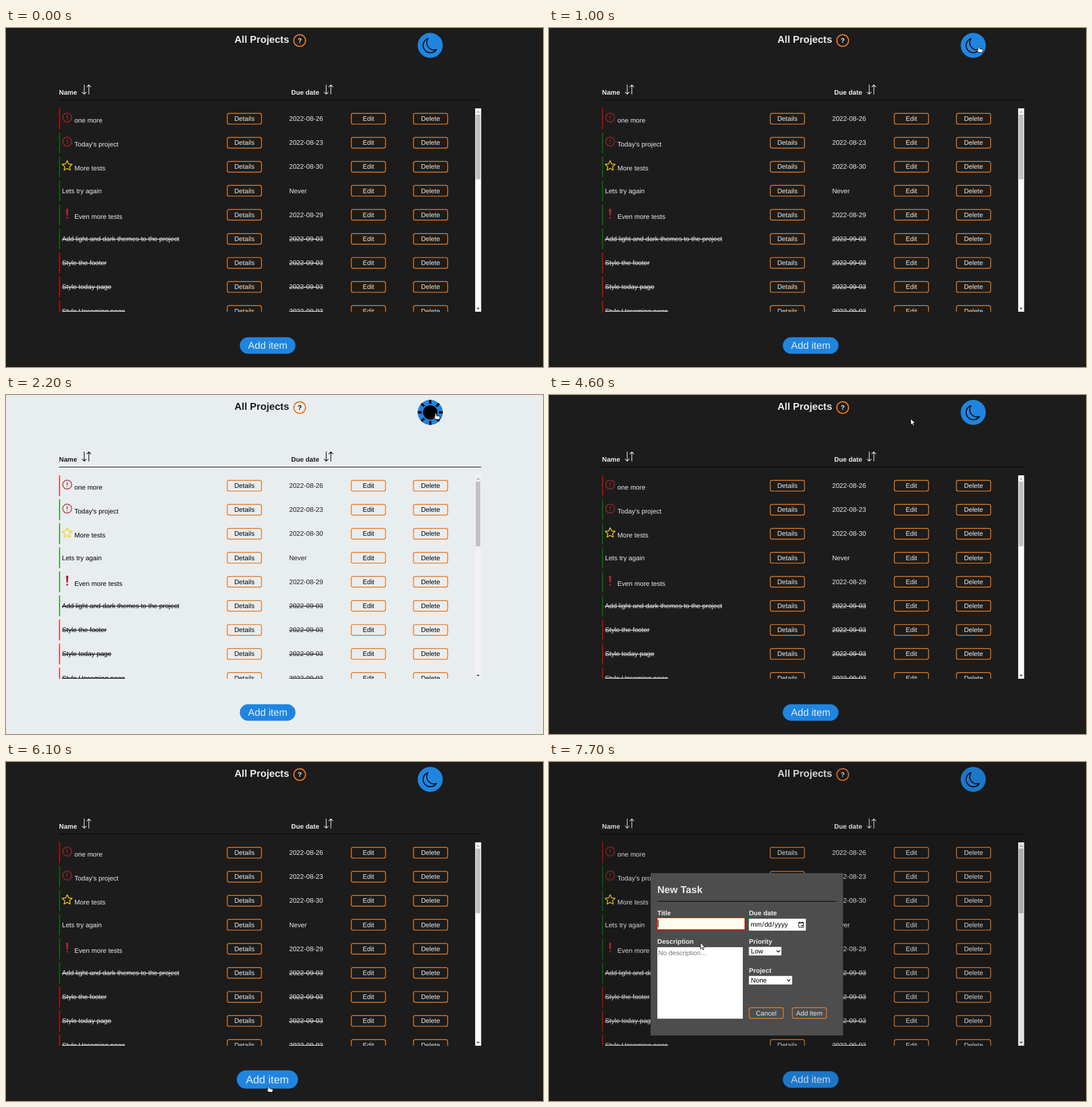
Write an HTML page that moves like this. It is 942 px wide and 595 px high and loops after 8000 ms.

```html
<!DOCTYPE html>
<html lang="en">
<head>
<meta charset="utf-8">
<title>All Projects</title>
<style>
  html, body { margin: 0; width: 100%; height: 100%; overflow: hidden; background: #1c1c1c; }
  #stage {
    --bg: #1c1c1c; --text: #e8edf0; --fade: #e8edf0; --arrow: #e8edf0; --track: #fbfbfb;
    display: block; width: 942px; height: 595px; background: var(--bg);
    font: 11.63px "Liberation Sans", Arial, sans-serif; text-rendering: geometricPrecision;
  }
  #stage.light { --bg: #e8edf0; --text: #1c1c1c; --fade: #000; --arrow: #000; --track: #f1f1f1; }
  #stage.fade0 { --fade: #dce0e2; --arrow: #c4cfd0; }
  #stage.fade1 { --fade: #747779; --arrow: #626768; }
  text { fill: var(--text); white-space: pre; }
  .fading { fill: var(--fade); }
  .bold { font-weight: bold; }
  .big { font-size: 17.45px; }
  .mid { text-anchor: middle; }
  .done { text-decoration: line-through; }
  .pale { fill: #e8edf0; }
  .ink { fill: #000; }
  .hint { fill: #757575; }
  .blue { fill: #1f85e0; }
  .white { fill: #fff; }
  .frame { fill: none; stroke: #e5791f; stroke-width: 1.45; }
  .line { fill: none; stroke: #000; }
  .sort { fill: none; stroke: var(--arrow); stroke-linecap: round; stroke-linejoin: round; }
  .alert { fill: none; stroke: brown; stroke-width: 1.1; stroke-linejoin: round; stroke-linecap: round; }
  .star { fill: none; stroke: #f6d010; stroke-width: 1.4; stroke-linejoin: round; }
  .cursor { fill: #fff; stroke: #000; stroke-width: .9; stroke-linejoin: round; }
</style>
</head>
<body>
<svg id="stage" viewBox="0 0 942 595">
  <defs>
    <clipPath id="listClip"><rect x="90" y="141" width="760" height="357"/></clipPath>
    <clipPath id="discClip"><circle r="22"/></clipPath>
    <path id="sort" class="sort" transform="scale(1.16)"
      d="M4.5 1V15M1.5 12l3 3 3-3M11.5 15V1M8.5 4l3-3 3 3"/>
  </defs>

  <text class="bold big" x="400.7" y="26">All Projects</text>
  <circle class="frame" cx="515.2" cy="22" r="10.3" style="stroke-width:2"/>
  <text class="bold mid fading" x="515.2" y="26.2">?</text>

  <g transform="translate(744.2 30.5)">
    <circle class="blue" r="22"/>
    <path id="moon" class="line" transform="translate(-12.9 -13) scale(1.64)" stroke-linejoin="round"
      d="M5.4 .6A7.8 7.8 0 1 0 14.5 12.3A7.8 7.8 0 0 1 5.4 .6Z"/>
    <g id="sun" clip-path="url(#discClip)"><circle r="12.6"/></g>
  </g>

  <text class="bold" x="93" y="117">Name</text>
  <use href="#sort" x="132" y="98.7"/>
  <text class="bold" x="500.3" y="117">Due date</text>
  <use href="#sort" x="556.5" y="98.7"/>
  <rect x="93" y="126" width="740.5" height="1"/>

  <g id="list" clip-path="url(#listClip)"></g>
  <rect x="823" y="141" width="10.5" height="357" style="fill:var(--track)"/>
  <rect x="824" y="152" width="8" height="113.5" fill="#c1c1c1"/>
  <path d="M825.3 148.5l2.9-3 2.9 3z" fill="#a3a3a3"/>
  <path d="M825.3 491l2.9 3 2.9-3z" fill="#505050"/>

  <g transform="translate(459 557.3)">
    <g id="add">
      <rect class="blue" x="-48.8" y="-14.5" width="97.6" height="29" rx="14.5"/>
      <text class="big mid pale" y="5.8">Add item</text>
    </g>
  </g>

  <g id="modal">
    <rect width="942" height="595" opacity=".1"/>
    <rect x="178.3" y="195" width="337.5" height="285" fill="#4d4d4d"/>
    <text class="bold big" x="190" y="230">New Task</text>
    <rect x="190" y="244" width="314" height="1"/>
    <g class="bold">
      <text x="190" y="269">Title</text>
      <text x="350.7" y="269">Due date</text>
      <text x="190" y="319">Description</text>
      <text x="350.7" y="319">Priority</text>
      <text x="350.7" y="370">Project</text>
    </g>
    <rect x="189.4" y="273" width="154.6" height="21.6" fill="#fffded" stroke="#c81616" stroke-width="2"/>
    <rect id="caret" x="191" y="277" width="1" height="13"/>
    <rect class="white" x="350.7" y="275" width="99.8" height="21"/>
    <text class="ink" y="289"><tspan x="353.8">mm</tspan><tspan x="373.9">/</tspan><tspan x="377.9">dd</tspan><tspan x="391.8">/</tspan><tspan x="395.8">yyyy</tspan></text>
    <path class="line" d="M438 281.8h8.6v8.2h-8.6zM438 282.6h8.6M439.8 280v2M444.8 280v2"/>
    <path d="M443 286h2.2v2.2h-2.2z"/>
    <rect class="white" x="190" y="325" width="150" height="125.5"/>
    <text class="hint" x="191.7" y="339">No description...</text>
    <rect class="white" x="350.7" y="324.5" width="57" height="15"/>
    <text class="ink" x="354.3" y="336">Low</text>
    <path class="line" d="M399.2 330.6l2.9 2.9 2.9-2.9" stroke-width="1.3"/>
    <rect class="white" x="350.7" y="375.5" width="75.8" height="15"/>
    <text class="ink" x="354.3" y="387">None</text>
    <path class="line" d="M417.6 381.6l2.9 2.9 2.9-2.9" stroke-width="1.3"/>
  </g>

  <path id="arrow" class="cursor" d="M.5 .5V11.6L3 9.3L4.8 13.3L6.6 12.5L4.9 8.6H8.5Z"/>
  <g id="hand" class="cursor">
    <path d="M2.6 1.4Q3.8 0 5 1.4V4.6L9.8 5.4Q11.4 5.8 11.3 7.3L10.4 11.6H3.9L.6 7.7Q.8 6.2 2.6 7Z"/>
    <path d="M7 5.2V7M9 5.6V7" stroke-width=".6"/>
  </g>
</svg>
<script>
const $ = id => document.getElementById(id);
const add = (parent, markup) => parent.insertAdjacentHTML('beforeend', markup);

const starPath = (cx, cy, points, outer, inner) => 'M' + Array.from({ length: points * 2 }, (_, i) => {
  const r = i % 2 ? inner : outer, a = i * Math.PI / points - Math.PI / 2;
  return (cx + r * Math.cos(a)).toFixed(2) + ' ' + (cy + r * Math.sin(a)).toFixed(2);
}).join('L') + 'Z';

const button = (cx, cy, label, style) =>
  `<rect class="frame" x="${cx - 30}" y="${cy - 9.4}" width="60" height="18.8" rx="3.2"/>
   <text class="mid ${style}" x="${cx}" y="${cy + 3.9}">${label}</text>`;

const icons = {
  alert: y => `<path class="alert" d="${starPath(107.3, y, 12, 8.7, 6.9)}"/>
    <path class="alert" style="stroke-width:1.6" d="M107.3 ${y - 3.4}v3.6m0 3v.1"/>`,
  star: y => `<path class="star" d="${starPath(107.3, y + .5, 5, 9.2, 4.4)}"/>`,
  bang: y => `<path fill="brown" d="M105.2 ${y - 8}q2.1-2 4.2 0l-.9 11q-1.2 1-2.4 0z"/>
    <circle fill="brown" cx="107.3" cy="${y + 7}" r="1.7"/>`
};

const rows = [
  ['one more', '2022-08-26', 'red', 'alert'],
  ["Today's project", '2022-08-23', 'green', 'alert'],
  ['More tests', '2022-08-30', 'green', 'star'],
  ['Lets try again', 'Never', 'green'],
  ['Even more tests', '2022-08-29', 'green', 'bang'],
  ['Add light and dark themes to the project', '2022-09-03', 'green', '', 'done'],
  ['Style the footer', '2022-09-03', 'red', '', 'done'],
  ['Style today page', '2022-09-03', 'red', '', 'done'],
  ['Style Upcoming page', '2022-09-03', 'red', '', 'done']
];
rows.forEach(([name, due, color, icon, state = ''], i) => {
  const y = 159.2 + i * 42.18;
  add($('list'), `<rect x="93.2" y="${y - 18.2}" width="1.45" height="36.4" fill="${color}"/>
    ${icon ? icons[icon](y - 2) : ''}
    <text class="fading ${state}" x="${icon ? 120 : 98.2}" y="${y + (icon ? 6.6 : 3.9)}">${name}</text>
    <text class="${state}" x="496.7" y="${y + 3.9}">${due}</text>
    ${button(418.2, y, 'Details', 'fading')}
    ${button(635.7, y, 'Edit', 'fading')}
    ${button(744.7, y, 'Delete', 'fading')}`);
});
add($('modal'), button(381, 440.6, 'Cancel', '') + button(456.7, 440.6, 'Add Item', ''));
for (let a = 0; a < 360; a += 45)
  add($('sun'), `<rect x="-2" y="-23" width="4" height="8" transform="rotate(${a})"/>`);

const LOOP = 8000;
const themes = [[0, ''], [2000, 'light fade0'], [2100, 'light fade1'], [2200, 'light'], [4600, '']];
const pointer = [
  [0, ''],
  [700, 'arrow', 743, 0], [800, 'hand', 744, 12], [900, 'hand', 748, 25], [1000, 'hand', 750, 31.3],
  [4600, 'arrow', 634, 41], [5000, 'arrow', 81, 157], [5600, 'arrow', 450, 506],
  [6100, 'hand', 457, 568], [6600, 'arrow', 459, 568], [7000, 'arrow', 265, 314], [7400, 'arrow', 265, 316.5]
];
const at = (track, t) => track.findLast(step => step[0] <= t);
const show = (id, on) => $(id).setAttribute('visibility', on ? 'visible' : 'hidden');

function draw(t) {
  const theme = at(themes, t)[1], light = theme !== '';
  $('stage').setAttribute('class', theme);
  show('moon', !light);
  show('sun', light);

  const [, kind, x, y] = at(pointer, t);
  for (const id of ['arrow', 'hand']) show(id, id === kind);
  if (kind) $(kind).setAttribute('transform', `translate(${x} ${y})`);

  const open = t >= 6600;
  $('modal').style.display = open ? '' : 'none';
  show('caret', open && (t < 7000 || t >= 7700));
  $('add').setAttribute('transform', t >= 6100 && !open ? 'translate(-.5 0) scale(1.1)' : '');
}

const start = performance.now();
(function tick() {
  draw((performance.now() - start) % LOOP);
  requestAnimationFrame(tick);
})();
</script>
</body>
</html>
```
